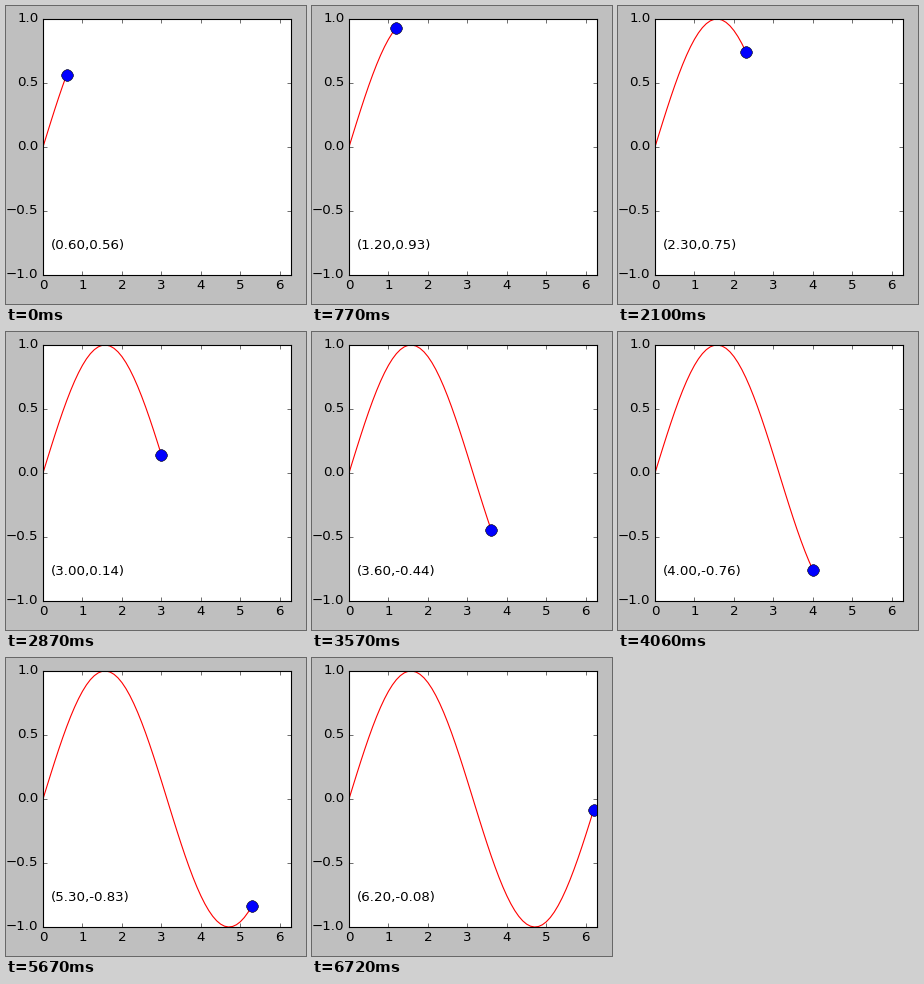
Recreate the animation shown at these times as a matplotlib script. Size 300 by 298 pixels, loop 7070 ms.

```python
import numpy as np
import matplotlib.pyplot as plt
from matplotlib.animation import FuncAnimation

plt.style.use("classic")
plt.rcParams.update({"savefig.dpi": "figure", "savefig.facecolor": "auto",
                     "font.family": "DejaVu Sans"})

W, H, DPI = 300, 298, 80
TICK_MS, TICKS = 70, 101
X_START, X_STEP, STEPS = 0.6, 0.1, 57

# Each step holds for two ticks, except these, which hold for one.
SHORT = {4, 8, *range(11, 30, 3), *range(33, 46, 4), 48, 51, 54}
holds = [1 if n in SHORT else 2 for n in range(STEPS - 1)]
starts = np.concatenate([[0], np.cumsum(holds)])

fig = plt.figure(figsize=(W / DPI, H / DPI), dpi=DPI, facecolor="0.75")
left, right, bottom, top = 37, 285, 29, 285
ax = fig.add_axes([left / W, bottom / H, (right - left) / W, (top - bottom) / H])
ax.set_xlim(0, 2 * np.pi)
ax.set_ylim(-1, 1)
ax.set_xticks(range(7))
ax.set_yticks(np.linspace(-1, 1, 5))

curve, = ax.plot([], [], "r-", lw=1)
# Snapping the outline to whole pixels gives the dot its crisp edge.
dot = ax.scatter([0], [0], s=10 ** 2, c="b", edgecolors="k", linewidths=0.5,
                 zorder=2, snap=True)
label = ax.text(0.2, -0.8, "")


def draw(tick):
    step = np.searchsorted(starts, tick, side="right") - 1
    x = X_START + X_STEP * step
    y = np.sin(x)
    xs = np.arange(0, x + X_STEP / 2, X_STEP)
    curve.set_data(xs, np.sin(xs))
    dot.set_offsets([[x, y]])
    label.set_text(f"({x:.2f},{y:.2f})")
    return curve, dot, label


anim = FuncAnimation(fig, draw, frames=TICKS, interval=TICK_MS,
                     repeat=True, repeat_delay=0, blit=False)
plt.show()
```
